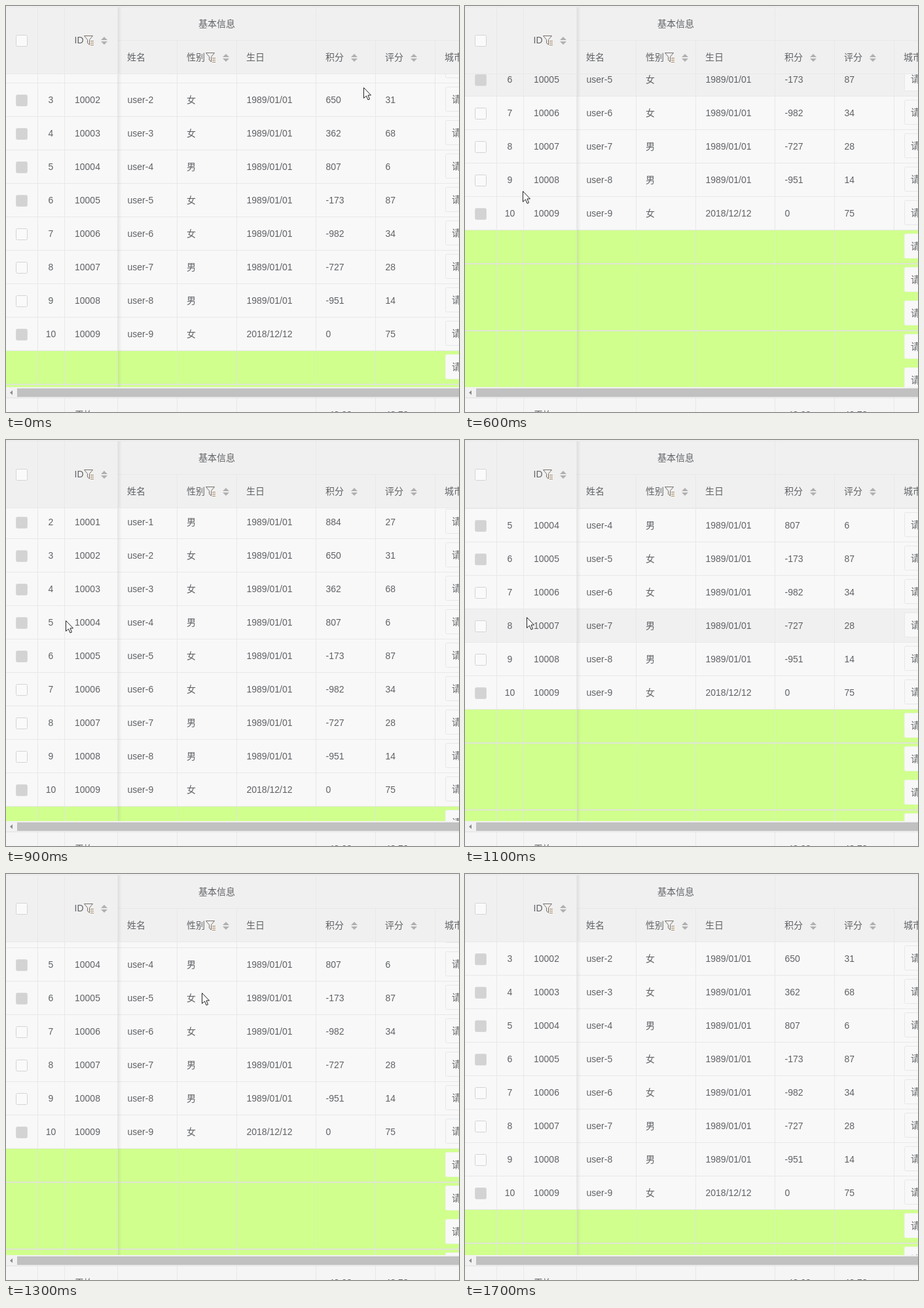
An HTML page with a canvas that plays this animation: 692 by 619 pixels, repeating every 2100 ms.

```html
<!DOCTYPE html>
<html lang="zh">
<head>
<meta charset="utf-8">
<style>
html, body { margin: 0; width: 100%; height: 100%; overflow: hidden; background: #f8f8f8; }
canvas { display: block; }
</style>
</head>
<body>
<canvas id="stage" width="692" height="619"></canvas>
<script>
const ctx = document.getElementById('stage').getContext('2d');
const W = 692, H = 619, ROW = 51, BODY_TOP = 104, BODY_END = 581;
const LINE = '#e8e8e8', TEXT = '#606266', HEAD = '#f0f0f0', GREEN = '#d0ff8e';
const columns = [48, 89, 170, 261, 352, 473, 564, 655];

// sex, points, rating for rows 2 to 10
const people = [
  ['男', 884, 27], ['女', 650, 31], ['女', 362, 68],
  ['男', 807, 6], ['女', -173, 87], ['女', -982, 34],
  ['男', -727, 28], ['男', -951, 14], ['女', 0, 75]
];

// step, bottom of the last filled row, pointer x, pointer y
const keys = [
  [0, 525, 546, 124], [4, 525, 87, 282], [5, 432, 87, 282], [6, 341, 88, 282],
  [7, 325, 89, 281], [9, 558, 91, 275], [10, 540, 92, 273], [11, 410, 94, 270],
  [12, 325, 95, 268], [14, 511, 503, 93], [15, 511, 583, 56], [16, 511, 640, 24],
  [17, 511, 700, 0]
];
const hovered = [0, 3, 4, 5, 6, 6, 6, 6, 0, 0, 0, 8, 8];

function pose(step) {
  const i = Math.max(1, keys.findIndex(k => k[0] >= step));
  const a = keys[i - 1], b = keys[i];
  const p = (step - a[0]) / (b[0] - a[0]);
  return [1, 2, 3].map(n => Math.round(a[n] + (b[n] - a[n]) * p));
}

function rect(x, y, w, h, color) {
  ctx.fillStyle = color;
  ctx.fillRect(x, y, w, h);
}

function text(s, x, y, align = 'left') {
  ctx.fillStyle = TEXT;
  ctx.textAlign = align;
  ctx.fillText(s, x, y);
}

function polygon(points, fill, stroke) {
  ctx.beginPath();
  points.forEach(([x, y]) => ctx.lineTo(x, y));
  ctx.closePath();
  if (fill) { ctx.fillStyle = fill; ctx.fill(); }
  if (stroke) { ctx.strokeStyle = stroke; ctx.stroke(); }
}

function box(x, y, w, h, fill, stroke) {
  ctx.beginPath();
  ctx.roundRect(x + .5, y + .5, w - 1, h - 1, 2);
  ctx.fillStyle = fill;
  ctx.fill();
  ctx.strokeStyle = stroke;
  ctx.stroke();
}

function checkbox(y, disabled) {
  box(15, y, 18, 18, disabled ? '#d3d3d3' : '#fafafa', disabled ? '#d9d9d9' : '#d4d4d4');
}

function cityInput(top, border) {
  box(671, top + 5, 60, 38, '#f8f8f8', border);
  text('请', 681, top + 29);
}

function sortIcon(x, y) {
  polygon([[x, y - 1], [x + 5, y - 6], [x + 10, y - 1]], '#b0b0b0');
  polygon([[x, y + 1], [x + 5, y + 6], [x + 10, y + 1]], '#b0b0b0');
}

function filterIcon(x, y) {
  polygon([[x + .5, y + .5], [x + 13.5, y + .5], [x + 8.5, y + 6.5],
    [x + 8.5, y + 14], [x + 5.5, y + 11.5], [x + 5.5, y + 6.5]], null, '#77706a');
  for (let i = 0; i < 3; i++) rect(x + 10, y + 8 + i * 3, 5, 1, '#a5845c');
}

function fixedShadow(y, h) {
  const g = ctx.createLinearGradient(171, 0, 177, 0);
  g.addColorStop(0, 'rgba(0,0,0,.07)');
  g.addColorStop(1, 'rgba(0,0,0,0)');
  rect(171, y, 6, h, g);
}

function drawBody(bottom, hover) {
  ctx.save();
  ctx.beginPath();
  ctx.rect(0, BODY_TOP, W, BODY_END - BODY_TOP);
  ctx.clip();
  rect(0, BODY_TOP, W, H, '#f8f8f8');
  people.forEach(([sex, points, rating], i) => {
    const n = i + 2, top = bottom + 1 - (10 - n + 1) * ROW, base = top + 30;
    if (n === hover) rect(0, top, W, ROW, HEAD);
    rect(0, top + 50, W, 1, LINE);
    columns.forEach(x => rect(x, top, 1, ROW, LINE));
    checkbox(top + 17, n < 7 || n === 10);
    text(n, 68.5, base, 'center');
    text(10000 + n - 1, 105, base);
    text('user-' + (n - 1), 185.5, base);
    text(sex, 276, base);
    text(n === 10 ? '2018/12/12' : '1989/01/01', 367.5, base);
    text(points, 488.5, base);
    text(rating, 579.5, base);
    cityInput(top, '#e6e7ea');
  });

  rect(0, bottom + 1, W, H, GREEN);
  columns.slice(0, 7).forEach(x => {
    const faint = x === 261 || x === 473;
    rect(x, bottom + 1, 1, H, faint ? '#d7f5ad' : '#e0e6d4');
  });
  for (let i = 0; i < 5; i++) {
    const top = bottom + 1 + i * ROW;
    if (i % 2 === 0) rect(0, top + 50, W, 2, '#e0e6d4');
    cityInput(top, '#eff3e8');
  }
  fixedShadow(BODY_TOP, H);
  ctx.restore();
}

function drawHeader() {
  rect(0, 0, W, BODY_TOP, HEAD);
  rect(0, 1, W, 1, LINE);
  rect(171, 52, W, 1, LINE);
  rect(0, 103, W, 1, LINE);
  columns.forEach(x => {
    const top = x <= 170 || x === 473 ? 1 : 52;
    rect(x, top, 1, 103 - top, LINE);
  });
  fixedShadow(2, 101);
  checkbox(44, false);
  text('ID', 104.5, 57);
  filterIcon(119, 45);
  sortIcon(145, 53);
  text('基本信息', 322, 32, 'center');
  text('姓名', 185, 83);
  text('性别', 276, 83);
  filterIcon(305, 71);
  sortIcon(331, 79);
  text('生日', 367, 83);
  text('积分', 488, 83);
  sortIcon(527, 79);
  text('评分', 579, 83);
  sortIcon(618, 79);
  text('城市', 670, 83);
}

function drawFooter() {
  rect(0, BODY_END, W, 17, '#f1f1f1');
  rect(17, 583, W, 13, '#c1c1c1');
  polygon([[6, 589.5], [10, 586], [10, 593]], '#8c8c8c');
  rect(0, 597, W, H, '#f5f5f5');
  rect(0, 597, W, 1, '#e2e2e2');
  columns.forEach(x => rect(x, 598, 1, H, LINE));
  text('平均', 105, 628);
  text('-43.63', 488.5, 628);
  text('43.78', 579.5, 628);
}

function drawPointer(x, y) {
  const shape = [[0, 0], [0, 16], [4, 12.5], [6.5, 18.5], [9, 17.5], [6.5, 11.5], [11, 11.5]];
  polygon(shape.map(([dx, dy]) => [x + dx + .5, y + dy + .5]), '#fff', '#222');
}

function draw(now) {
  const step = Math.min(17, Math.floor(now % 2100 / 100));
  const [bottom, x, y] = pose(step);
  ctx.font = '14px "Liberation Sans", "Noto Sans CJK SC", "Noto Sans CJK", sans-serif';
  ctx.lineWidth = 1;
  drawBody(bottom, hovered[step]);
  drawHeader();
  drawFooter();
  drawPointer(x, y);
}

const start = performance.now();
function tick() {
  draw(performance.now() - start);
  requestAnimationFrame(tick);
}
tick();
</script>
</body>
</html>
```
